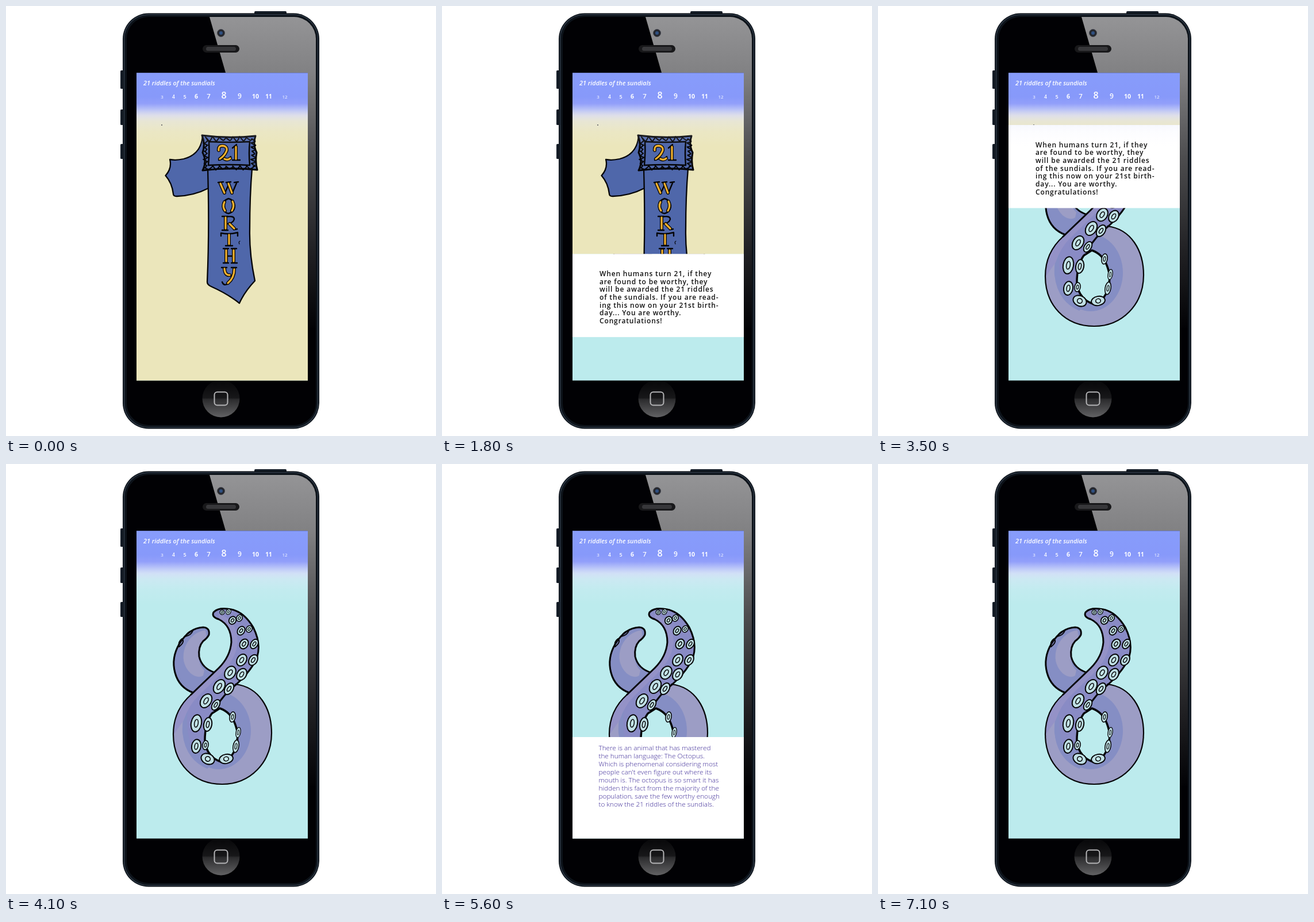
These frames come from a looping animation (748x748 px, 8 s). An HTML page:

```html
<!DOCTYPE html>
<html lang="en">
<head>
<meta charset="utf-8">
<title>Phone story</title>
<style>
  html, body { margin: 0; width: 100%; height: 100%; overflow: hidden; background: #fff; }
  svg { display: block; width: 100%; height: 100%; }
  text { font-family: "Open Sans", "Noto Sans", sans-serif; }
  .title { font: italic 600 10.9px "Open Sans", sans-serif; }
  .story { font-size: 12px; font-weight: 600; letter-spacing: .85px; fill: #111; }
  .fact { font-size: 11.75px; font-weight: 300; fill: #372494; }
  .ink { fill: none; stroke: #050507; stroke-linecap: round; stroke-linejoin: round; }
  .gold { fill: none; stroke: #f0b02f; stroke-linecap: round; }
</style>
</head>
<body>
<svg id="stage" viewBox="0 0 748 748">
  <defs>
    <clipPath id="screen"><rect x="227" y="116" width="298" height="535.5"/></clipPath>
    <clipPath id="face"><rect x="210" y="19" width="329" height="710" rx="38"/></clipPath>
    <clipPath id="tieClip"><rect id="tieWindow" x="227" y="116" width="298" height="536"/></clipPath>
    <path id="ring" d="M399 383C440 388 462 425 462 468C462 520 424 557 376 557C325 557 291 520 291 470C291 440 303 418 322 401"/>
    <clipPath id="ringClip"><use href="#ring"/></clipPath>
    <linearGradient id="shine" gradientUnits="userSpaceOnUse" x1="0" y1="19" x2="0" y2="560">
      <stop offset="0" stop-color="#949496"/><stop offset=".18" stop-color="#818183"/>
      <stop offset=".45" stop-color="#4d4d4f"/><stop offset=".75" stop-color="#212124"/>
      <stop offset="1" stop-color="#020205"/>
    </linearGradient>
    <linearGradient id="header" gradientUnits="userSpaceOnUse" x1="0" y1="116" x2="0" y2="244">
      <stop offset="0" stop-color="#879cfb"/><stop offset=".33" stop-color="#8799fa"/>
      <stop offset=".42" stop-color="#929ffa"/>
      <stop offset=".5" stop-color="#b6c0f9" stop-opacity=".96"/>
      <stop offset=".58" stop-color="#d8dbfa" stop-opacity=".74"/>
      <stop offset=".66" stop-color="#e2e5fa" stop-opacity=".4"/>
      <stop offset=".8" stop-color="#e8ebfc" stop-opacity=".14"/>
      <stop offset="1" stop-color="#f0f0ff" stop-opacity="0"/>
    </linearGradient>
    <linearGradient id="home" x1="0" y1="0" x2="0" y2="1">
      <stop offset="0" stop-color="#060608"/><stop offset=".48" stop-color="#171719"/>
      <stop offset=".52" stop-color="#2b2b2d"/><stop offset="1" stop-color="#626264"/>
    </linearGradient>
  </defs>

  <g id="phone">
    <g fill="#151d27">
      <rect x="432" y="9" width="56" height="8" rx="2"/>
      <rect x="199" y="112" width="8" height="32" rx="1.500"/>
      <rect x="199" y="180" width="8" height="27" rx="1.500"/>
      <rect x="199" y="240" width="8" height="26" rx="1.500"/>
    </g>
    <rect x="203" y="12.500" width="342" height="723" rx="45" fill="#0c1219"/>
    <rect x="205.500" y="15" width="337" height="718" rx="42" fill="none" stroke="#2f3a47" stroke-width="1.500"/>
    <rect x="210" y="19" width="329" height="710" rx="38" fill="#010104"/>
    <path d="M354 19L382 116H525V560H539V19Z" fill="url(#shine)" clip-path="url(#face)"/>
    <circle cx="374" cy="47" r="6.500" fill="#24262c" stroke="#4a4c54"/>
    <circle cx="374" cy="47" r="3" fill="#2f4f80"/>
    <rect x="342" y="68" width="64" height="13" rx="6.500" fill="#18181a"/>
    <rect x="348" y="71" width="52" height="7" rx="3.500" fill="#37373a"/>
    <circle cx="374" cy="683" r="32.500" fill="url(#home)"/>
    <rect x="362.500" y="671.500" width="23" height="23" rx="5" fill="none" stroke="#b4b4b6" stroke-width="2"/>
  </g>

  <g clip-path="url(#screen)">
    <g id="octopus">
      <path d="M227 116h298v536H227z" fill="#bcebed"/>
      <path d="M353 297Q355 285 343 284Q319 285 302 312Q287 337 294 363Q301 389 326 398L364 363Q341 356 336 335Q334 318 343 308Q350 303 353 297Z" fill="#858ec4"/>
      <path d="M347 289Q323 293 312 317Q302 345 321 364Q334 374 343 368L345 359Q334 349 335 327Q339 310 349 301Z" fill="#9c9dc5"/>
      <path class="ink" stroke-width="3" d="M326 398Q301 389 294 363Q287 337 302 312Q319 285 343 284Q355 285 353 297Q350 303 343 308Q334 318 336 335Q341 356 364 363"/>
      <path class="ink" stroke-width="2" d="M301 318Q299 309 306 304Q312 309 301 318M312 300Q316 291 325 290Q322 298 312 300"/>
      <use href="#ring" fill="#9c9dc5"/>
      <g clip-path="url(#ringClip)">
        <ellipse cx="370" cy="464" rx="56" ry="67" fill="#858ec4"/>
        <path d="M340 385Q304 422 307 468Q312 514 350 530L366 515L347 465L385 395Z" fill="#858ec4"/>
      </g>
      <path d="M370 270Q357 266 361 258Q368 250 386 252Q412 254 430 284Q444 312 437 335Q429 357 402 382Q377 402 365 424Q348 448 346 490L322 490Q308 450 322 402L370 355Q390 335 392 310Q392 281 370 270Z" fill="#898bc5"/>
      <path d="M370 261Q402 270 403 310Q400 342 369 370L334 404Q318 420 309 446L292 470Q293 425 322 401L370 355Q390 335 392 310Q392 281 370 270Z" fill="#9492c7"/>
      <use class="ink" href="#ring" stroke-width="2.200"/>
      <path class="ink" stroke-width="3" d="M322 401L370 355Q390 335 392 310Q392 281 370 270Q357 266 361 258Q368 250 386 252Q412 254 430 284Q444 312 437 335Q429 357 402 382Q377 402 365 424"/>
      <path class="ink" style="fill:#bcebed" stroke-width="3.500" d="M372 425Q390 431 398 451Q407 473 399 495Q391 516 374 518Q352 511 346 486Q345 452 358 434Z"/>
      <g id="suckers"></g>
    </g>

    <g id="tie" clip-path="url(#tieClip)">
      <path d="M227 116h298v536H227z" fill="#ebe6bb"/>
      <circle cx="271" cy="207" r="1" fill="#111"/>
      <g class="ink" style="fill:#4f67aa" stroke-width="2.300">
        <path d="M342 225Q340 258 309 266Q296 269 285 267Q289 282 277.500 295Q289 308 291 327Q291 331 297 331Q327 330 352 317V284Z"/>
        <path d="M351 283Q354 390 350 480Q350 485 357 488Q386 501 406 517Q415 497 433 478Q423 430 424 388Q424 330 428 283Z"/>
        <path stroke-width="3" d="M341 225Q388 231 434 226Q429 241 436 255Q433 271 437 285Q390 280 342 286Q350 270 342 255Q347 240 341 225Z"/>
        <path id="frill" style="fill:none" stroke-width="2"/>
        <path stroke-width="2.500" d="M353 236Q389 238 424 236Q422 256 424 277Q389 275 352 277Q354 256 353 236Z"/>
      </g>
      <g id="lettering"></g>
      <path class="ink" stroke-width="1.200" d="M407 409q-3 1 -1 5"/>
    </g>

    <g id="storyPanel"><rect x="227" width="298" height="144.500" fill="#fff"/></g>
    <g id="factPanel"><rect x="227" width="298" height="180" fill="#fff"/></g>

    <g id="top" fill="#fff">
      <path d="M227 116h298v128H227z" fill="url(#header)"/>
      <path d="M227 116h298" stroke="#56639c"/>
      <text class="title" x="239" y="138">21 riddles of the sundials</text>
    </g>
  </g>
</svg>
<script>
const $ = id => document.getElementById(id);

function add(parent, tag, attrs, text = "") {
  const el = document.createElementNS("http://www.w3.org/2000/svg", tag);
  for (const key in attrs) el.setAttribute(key, attrs[key]);
  el.textContent = text;
  return parent.appendChild(el);
}

function addLines(panel, cls, x, y, pitch, lines) {
  lines.forEach((line, i) => add(panel, "text", { class: cls, x, y: y + i * pitch }, line));
}

addLines($("storyPanel"), "story", 274, 38.5, 13.7, [
  "When humans turn 21, if they",
  "are found to be worthy, they",
  "will be awarded the 21 riddles",
  "of the sundials. If you are read-",
  "ing this now on your 21st birth-",
  "day... You are worthy.",
  "Congratulations!"
]);
addLines($("factPanel"), "fact", 272.5, 22.5, 14, [
  "There is an animal that has mastered",
  "the human language: The Octopus.",
  "Which is phenomenal considering most",
  "people can't even figure out where its",
  "mouth is. The octopus is so smart it has",
  "hidden this fact from the majority of the",
  "population, save the few worthy enough",
  "to know the 21 riddles of the sundials."
]);

// Chapter numbers: label, centre, size, weight
[[3, 271.5, 8, 400], [4, 291.5, 8.5, 600], [5, 311, 9, 600], [6, 331, 10.5, 700],
 [7, 352.5, 11.5, 600], [8, 379, 16, 600], [9, 406.5, 12, 600], [10, 434, 10.5, 700],
 [11, 457, 10, 700], [12, 485, 8, 400]].forEach(([label, x, size, weight]) =>
  add($("top"), "text", { x, y: 161, "font-size": size, "font-weight": weight, "text-anchor": "middle" }, label));

// Suckers: centre and radii
[[376, 258, 4, 4], [387, 257, 4, 5], [394, 272, 6, 7], [406, 268, 5, 6], [409, 290, 6, 8],
 [423, 287, 5, 6], [414, 313, 7, 9], [432, 313, 6, 9], [410, 341, 8, 11], [430, 341, 7, 10],
 [390, 363, 9, 12], [410, 366, 8, 11], [371, 387, 9, 13], [388, 391, 7, 11], [348, 412, 9, 13],
 [365, 419, 6, 10], [331, 451, 9, 15], [351, 453, 7, 12], [331, 491, 8, 12], [347, 489, 5, 8],
 [351, 513, 12, 9], [383, 513, 12, 8], [400, 491, 5, 11], [404, 467, 4, 9], [394, 440, 5, 9]
].forEach(([x, y, rx, ry]) => {
  const tilt = rx > ry ? (x < 370 ? 25 : -10) : y < 430 ? 32 : 10;
  const g = add($("suckers"), "g", { transform: `translate(${x} ${y}) rotate(${tilt})` });
  const line = Math.min(2, rx / 3.2);
  add(g, "ellipse", { rx, ry, fill: "#bfdfe4", stroke: "#050507", "stroke-width": line });
  add(g, "ellipse", { rx: rx * .36, ry: ry * .46, fill: "#c4e6e9", stroke: "#050507", "stroke-width": line * .75 });
});

// Ruffled border: a soft wave inside the band around the badge
const ruffle = [];
for (let i = 0; i <= 56; i++) {
  const s = i / 56 * 4, side = Math.floor(s) % 4, f = s % 1;
  const swing = (i % 2 ? 3 : -3) + Math.sin(i * 2.3);
  ruffle.push([[347 + 83 * f, 231 + swing], [430 + swing, 231 + 50 * f],
               [430 - 83 * f, 281 + swing], [347 + swing, 281 - 50 * f]][side]);
}
$("frill").setAttribute("d", "M" + ruffle[0] + ruffle.slice(1).map(([x, y], i) => {
  const [px, py] = ruffle[i];
  return `Q${px + 2} ${py + 2} ${x} ${y}`;
}).join(""));

// Hand lettering: gold stems and thin black strokes
[["M370 251Q369 243 377 243Q385 244 384 251Q381 260 372 266M380 266Q386 269 390 265M400 245V266",
  "M368 251q3 2 4-1M370 268L380 265M391 266v-4M394 247L401 241M394 268h13"],
 ["M373 309L380 325M387 309L393 325", "M380 327L388 309M393 327L401 308M369 307l9-1M383 307l8-1M397 307l7-1"],
 ["M380 341Q376 349 381 356M394 340Q398 348 393 356", "M387 335Q376 339 377 349Q379 360 387 361Q398 358 398 347Q396 337 387 335"],
 ["M382 368V387M389 379L397 387", "M382 367Q397 364 397 371Q395 378 384 379M376 366h10M376 390h10M396 389l6-1"],
 ["M388 398V414", "M374 400v-5Q388 398 403 394v6M382 417h12"],
 ["M383 425V444M396 425V444", "M383 435H396M378 422h9M392 422h9M378 447h9M392 447h10"],
 ["M380 457Q381 469 389 468M397 458Q397 473 386 482", "M375 455h9M392 455h9M386 483Q379 488 376 480"]
].forEach(([stems, strokes]) => {
  const g = $("lettering");
  add(g, "path", { class: "ink", d: stems, "stroke-width": 6 });
  add(g, "path", { class: "ink", d: strokes, "stroke-width": 2.4 });
  add(g, "path", { class: "gold", d: stems, "stroke-width": 3.3 });
});

const BOTTOM = 652, GONE = -200;

function storyTop(k) {
  if (k < 10) return BOTTOM;
  if (k < 12) return 618;
  if (k <= 14) return 618 - 24.33 * (k - 11);
  if (k <= 22) return 545 - 28.4 * (k - 14);
  if (k < 32) return 318;
  return k < 41 ? 318 - 27.75 * (k - 31) : GONE;
}

function factTop(k) {
  const shown = Math.min(Math.max(k - 50, 0), 6) - Math.min(Math.max(k - 65, 0), 6);
  return BOTTOM - 29.5 * shown;
}

function draw(time) {
  const k = Math.floor(time % 8000 / 100);
  const top = storyTop(k);
  $("storyPanel").setAttribute("transform", `translate(0 ${top})`);
  $("factPanel").setAttribute("transform", `translate(0 ${factTop(k)})`);
  $("tieWindow").setAttribute("height", Math.max(0, top - 116));
  $("tie").setAttribute("visibility", top > 116 ? "visible" : "hidden");
}

const start = performance.now();
function tick() {
  draw(performance.now() - start);
  requestAnimationFrame(tick);
}
tick();
</script>
</body>
</html>
```
